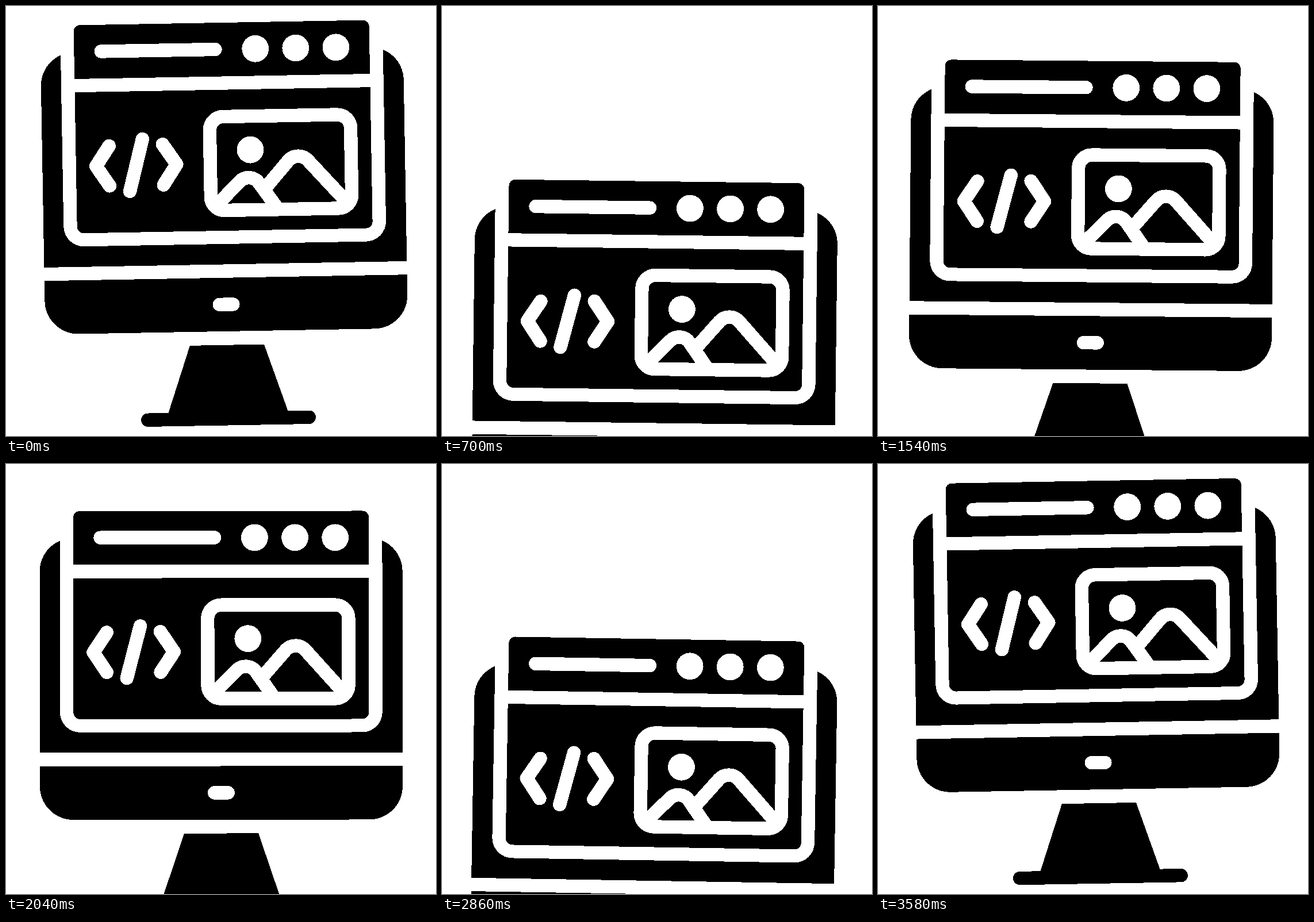
An HTML page that plays this animation: 748 px wide and 748 px high, repeating every 3600 ms.

```html
<!DOCTYPE html>
<html lang="en">
<head>
<meta charset="utf-8">
<title>Swinging monitor</title>
<style>
  html, body { margin: 0; width: 100%; height: 100%; overflow: hidden; background: #fff; }
  svg { display: block; width: 100vw; height: 100vh; shape-rendering: crispEdges; }
  .white { fill: #fff; }
  .line { fill: none; stroke: #fff; stroke-width: 23.4; }
  .round { stroke-linecap: round; stroke-linejoin: round; }
</style>
</head>
<body>
<svg viewBox="0 0 748 748">
  <g id="monitor">
    <!-- screen, chin and stand -->
    <path d="M58.5 449.5V134a58 58 0 0 1 58-58H631.5a58 58 0 0 1 58 58V449.5Z"/>
    <path d="M58.5 472.8H689.5V508a58 58 0 0 1-58 58H116.5a58 58 0 0 1-58-58Z"/>
    <rect class="white" x="350.5" y="507.5" width="47" height="23.4" rx="11.7"/>
    <path d="M309.6 589.8H438.7L478.8 708H269.6Z"/>
    <rect x="222.5" y="706.2" width="303.9" height="23.4" rx="11.7"/>

    <!-- browser window -->
    <path class="white" d="M93.6 0H654.4V379a35 35 0 0 1-35 35H128.6a35 35 0 0 1-35-35Z"/>
    <path d="M117 122.5V40a11 11 0 0 1 11-11H620a11 11 0 0 1 11 11V122.5Z"/>
    <path d="M117 145.7H631V379.3a11.7 11.7 0 0 1-11.7 11.7H128.7a11.7 11.7 0 0 1-11.7-11.7Z"/>
    <path class="line round" d="M164 75.3H362.6"/>
    <g class="white">
      <circle cx="432.4" cy="75.3" r="23.4"/>
      <circle cx="502.5" cy="75.3" r="23.4"/>
      <circle cx="572.6" cy="75.3" r="23.4"/>
      <circle cx="420.6" cy="251" r="23.4"/>
    </g>

    <!-- code sign -->
    <path class="line round" d="M175 240L151.8 274.8L175 309.5M233.3 229L209.9 319.6M268.2 238.8L292 273.9L268.8 309.4"/>

    <!-- picture -->
    <rect class="line" x="350.6" y="192.5" width="245.2" height="163" rx="23.4"/>
    <path class="line" d="M356 351L401.2 305.7A22 22 0 0 1 434.5 308.6L465 352"/>
    <path class="line" d="M444 319.8L486.2 271.3A22.8 22.8 0 0 1 520.4 271L588 346"/>
  </g>
</svg>
<script>
  const LOOP = 3600;
  const monitor = document.getElementById("monitor");

  // Turning points as [ms, value]; sine easing in between.
  const drop = [[0, 0], [842, 296], [1825, 12], [2702, 298], [LOOP, 0]];
  const tilt = [[0, -1], [545, 1], [1190, -1], [1715, 1], [2346, -1], [2905, 0.97], [3512, -1], [LOOP, -1]];

  function valueAt(keys, t) {
    const next = keys.findIndex(([time]) => time > t);
    const [t0, a] = keys[next - 1];
    const [t1, b] = keys[next];
    return a + (b - a) * (1 - Math.cos(Math.PI * (t - t0) / (t1 - t0))) / 2;
  }

  function draw() {
    const t = performance.now() % LOOP;
    monitor.setAttribute("transform",
      `translate(0 ${valueAt(drop, t)}) rotate(${valueAt(tilt, t)} 374 0)`);
    requestAnimationFrame(draw);
  }
  draw();
</script>
</body>
</html>
```
